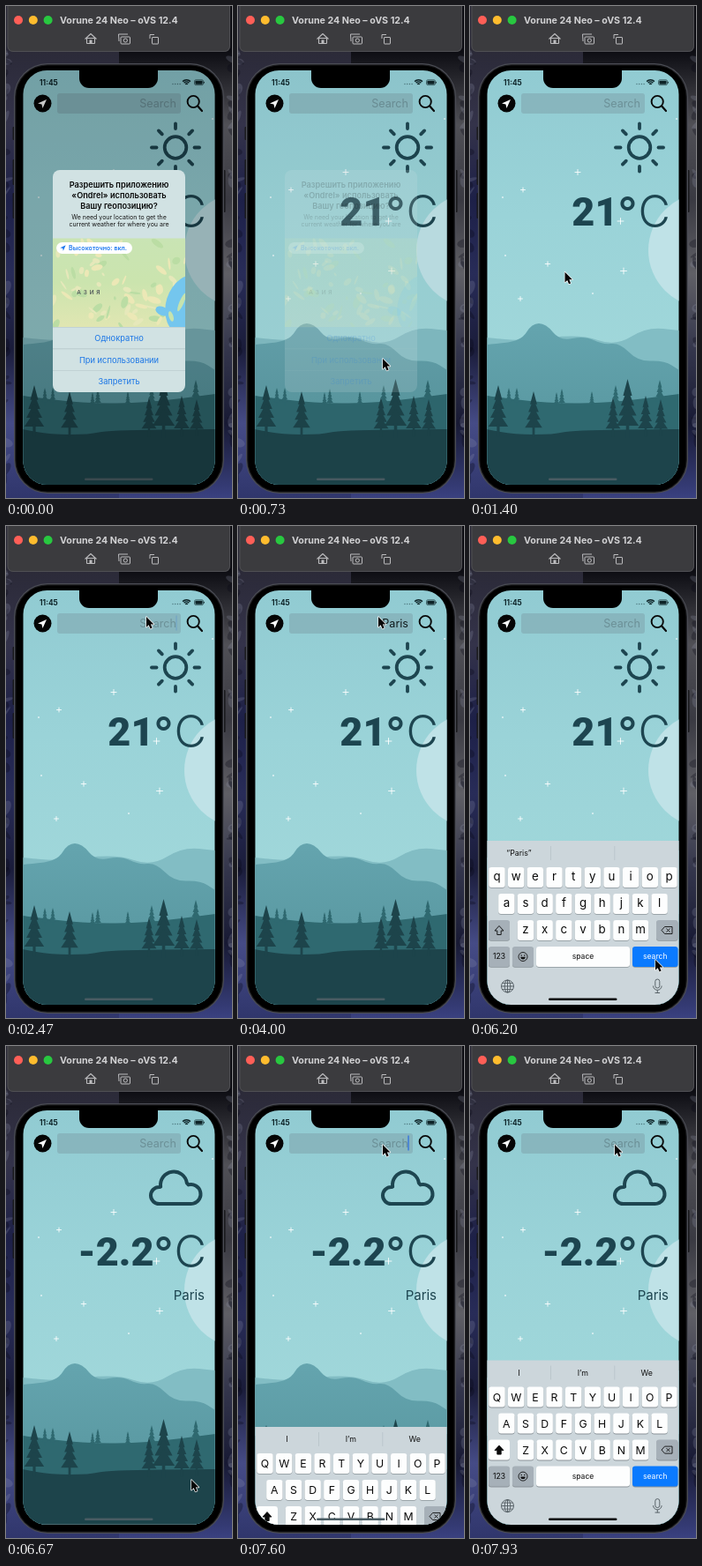
Animation, 256 px wide and 558 px high, one loop 8 s. Source, as an HTML page with a canvas:

```html
<!DOCTYPE html>
<html lang="ru">
<head>
<meta charset="utf-8">
<title>Weather app</title>
<style>
html, body { margin: 0; width: 100%; height: 100%; overflow: hidden; background: #0a0c1c; }
canvas { display: block; width: 256px; height: 558px; }
</style>
</head>
<body>
<canvas id="stage"></canvas>
<script>
const W = 256, H = 558, LOOP = 8000;
const cv = document.getElementById('stage');
const c = cv.getContext('2d');
const dpr = window.devicePixelRatio || 1;
cv.width = W * dpr;
cv.height = H * dpr;

const INK = '#1d4550', BLUE = '#0a7aff', TAU = Math.PI * 2;
const SANS = 'Inter, Roboto, sans-serif';

// ---- timing, ms ----
const T = {
  allow: 555, focus: 2200, rise: 5165, search: 6195, result: 6670, refocus: 7490,
  keys: [2670, 3070, 3330, 3530, 3670]
};
const CITY = 'Paris';

// ---- helpers ----
const clamp = v => Math.min(1, Math.max(0, v));
const ease = v => v * v * (3 - 2 * v);
// critically damped spring: share of the way still to go
function rest(ms) {
  const k = Math.max(0, ms) * 0.018;
  return (1 + k) * Math.exp(-k);
}
function random(seed) {
  return () => (seed = (seed * 16807) % 2147483647) / 2147483647;
}
function fill(color) {
  c.fillStyle = color;
  c.fill();
}
function stroke(color, width) {
  c.strokeStyle = color;
  c.lineWidth = width;
  c.stroke();
}
function box(x, y, w, h, r, color) {
  c.beginPath();
  c.roundRect(x, y, w, h, r);
  fill(color);
}
function frameBox(x, y, w, h, r, color, width) {
  c.beginPath();
  c.roundRect(x, y, w, h, r);
  stroke(color, width);
}
function oval(x, y, rx, ry, tilt = 0) {
  c.beginPath();
  c.ellipse(x, y, rx, ry, tilt, 0, TAU);
}
function disc(x, y, r, color) {
  oval(x, y, r, r);
  fill(color);
}
function ring(x, y, r, color, width) {
  oval(x, y, r, r);
  stroke(color, width);
}
function trace(...points) {
  c.beginPath();
  points.forEach(p => c.lineTo(...p));
}
function line(color, width, ...points) {
  trace(...points);
  stroke(color, width);
}
function cross(x, y, r, color, width) {
  line(color, width, [x - r, y], [x + r, y]);
  line(color, width, [x, y - r], [x, y + r]);
}
function text(str, x, y, size, color, weight = 400, align = 'center', family = SANS) {
  c.font = `${weight} ${size}px ${family}`;
  c.textAlign = align;
  c.fillStyle = color;
  c.fillText(str, x, y);
}
function vertical(y0, y1, ...colors) {
  const g = c.createLinearGradient(0, y0, 0, y1);
  colors.forEach((col, i) => g.addColorStop(i / (colors.length - 1), col));
  return g;
}

// ---- desktop and window ----
function desktop() {
  c.fillStyle = vertical(50, H, '#2b2a38', '#34334a', '#1d2048', '#282c58', '#1a1c3a', '#454b86', '#30366c');
  c.fillRect(0, 0, W / 2, H);
  c.fillStyle = vertical(50, H, '#0c0c12', '#505056', '#3a3a42', '#606066', '#34364c', '#181a34', '#3a4180');
  c.fillRect(W / 2, 0, W / 2, H);
  const rnd = random(77);
  for (let i = 0; i < 60; i++) {
    oval(i % 2 * W, 52 + rnd() * 506, 2 + rnd() * 7, 1 + rnd() * 4, rnd() * 3);
    fill(rnd() < 0.5 ? 'rgba(160,165,190,.2)' : 'rgba(6,7,20,.3)');
  }
}
function toolbar() {
  box(1.5, -8, 252.5, 60, 6, '#3b3b3e');
  frameBox(2, -8, 251.5, 59.5, 6, '#5a5a5e', 0.7);
  ['#ff5f57', '#febc2e', '#28c840'].forEach((col, i) => disc(14 + i * 16.8, 16, 5, col));
  text('Vorune 24 Neo – oVS 12.4', 61, 20, 10.7, '#d2d2d4', 700, 'left');
  const g = '#bcbcbe';
  c.lineJoin = 'round';
  line(g, 1.1, [89.5, 37.5], [96, 31.5], [102.5, 37.5]);
  frameBox(91.5, 36.5, 9, 6, 0.5, g, 1.1);
  box(94.5, 38.5, 3, 4, 0, g);
  line(g, 1, [128, 40], [127.5, 32], [138, 32]);
  frameBox(130, 35, 10.5, 8, 1, g, 1);
  ring(135.3, 39, 2.1, g, 1);
  frameBox(165.5, 35.5, 7, 7.5, 0.5, g, 1);
  line(g, 1, [163, 37], [163, 32.5], [168, 32.5]);
}
function phoneBody() {
  box(7.6, 137, 3, 15, 1, '#17171a');
  [174, 212].forEach(y => box(7.6, y, 3, 29, 1, '#17171a'));
  box(245.5, 186, 3, 48, 1, '#17171a');
  ['#4b4d55', '#1a1a1d', '#000'].forEach((col, i) => {
    const d = i * 1.2;
    box(9 + d, 65 + d, 238 - 2 * d, 488 - 2 * d, 38 - d, col);
  });
}

// ---- scenery ----
function tree(x, top, bottom, color) {
  const h = bottom - top, half = h * 0.2;
  for (let i = 0; i < 4; i++) {
    const w = half * (0.4 + i * 0.2), y = top + h * i * 0.18;
    trace([x, y], [x + w, y + h * 0.3], [x - w, y + h * 0.3]);
    fill(color);
  }
  c.fillRect(x - half * 0.14, top + h * 0.8, half * 0.28, h * 0.25);
}
// smooth hill line through the middles between the given points
function ridge(color, ...points) {
  c.beginPath();
  c.moveTo(19, 545);
  c.lineTo(...points[0]);
  points.slice(1).forEach(([x, y], i) => {
    const [px, py] = points[i];
    c.quadraticCurveTo(px, py, (px + x) / 2, (py + y) / 2);
  });
  c.lineTo(...points[points.length - 1]);
  c.lineTo(238, 545);
  fill(color);
}
function scenery() {
  c.fillStyle = vertical(73, 400, '#91cbd2', '#9ad3d8', '#a0d7da');
  c.fillRect(19, 73, 218, 470);
  disc(267, 277, 65, '#bfe2e7');
  [[122, 188.5], [60, 208.5], [174, 300.5], [88, 292.5], [57, 332], [170.5, 244]]
    .forEach(([x, y]) => cross(x, y, 2.4 + x / 120, 'rgba(255,255,255,.85)', 1));
  [[40, 283], [139, 326], [37, 217], [234, 128]].forEach(p => disc(...p, 1, 'rgba(255,255,255,.7)'));

  ridge('#82bdc4', [19, 376], [60, 380], [125, 372], [165, 386], [200, 364], [237, 368]);
  ridge(vertical(362, 450, '#64a4ae', '#5c9ba4'), [19, 384], [58, 380], [70, 360], [86, 360], [102, 380],
    [130, 374], [150, 384], [170, 382], [190, 403], [220, 402], [237, 413]);

  const mid = '#2f6970', front = '#1d444b';
  ridge(mid, [19, 442], [90, 451], [160, 450], [237, 440]);
  [[44, 433], [53, 433], [98, 438], [104, 434], [138, 437], [165, 430], [215, 424]]
    .forEach(([x, top]) => tree(x, top, 453, mid));
  ridge(front, [19, 480], [50, 486], [95, 486], [115, 481], [237, 480]);
  [[32, 430], [72, 437], [162, 444], [178.5, 423], [199, 442], [216, 446]]
    .forEach(([x, top]) => tree(x, top, 486, front));
}

// ---- app ----
function arrow(x, y, s, color) {
  trace([x + s, y - s], [x + s * 0.1, y + s], [x - s * 0.1, y + s * 0.1], [x - s, y - s * 0.1]);
  fill(color);
}
function statusBar() {
  const dark = '#0d2327';
  text('11:45', 38, 90, 8.3, dark, 700, 'left');
  for (let i = 0; i < 4; i++) disc(189 + i * 2.7, 88.5, 0.7, '#4b757b');
  for (let i = 0; i < 3; i++) {
    c.beginPath();
    c.arc(204.5, 90, 1.8 + i * 2.2, -TAU * 0.375, -TAU * 0.125);
    stroke(dark, 1.5);
  }
  frameBox(213.5, 83.8, 10, 5.8, 1.6, dark, 0.6);
  box(214.4, 84.7, 8.2, 4, 0.9, dark);
  box(224.2, 85.7, 0.8, 2, 0.4, dark);
}
function sun() {
  ring(192, 160.5, 12.3, INK, 3.8);
  c.lineCap = 'round';
  for (let i = 0; i < 8; i++) {
    const a = i * TAU / 8, at = r => [192 + Math.cos(a) * r, 160.5 + Math.sin(a) * r];
    line(INK, 3.8, at(21.5), at(27));
  }
  c.lineCap = 'butt';
}
function cloud() {
  const deg = TAU / 360;
  c.beginPath();
  c.arc(173.5, 169.5, 9.5, 90 * deg, 272 * deg);
  c.arc(190, 157.5, 15, 172 * deg, 352 * deg);
  c.arc(209.5, 168, 11, 255 * deg, 450 * deg);
  c.closePath();
  stroke(INK, 4);
}
// visible for a while after each edit, then dark for 200 of every 500 ms
function caret(t) {
  const edit = [T.focus, ...T.keys, T.refocus].filter(k => k <= t).pop();
  if (!edit || (t >= T.search && t < T.refocus)) return 0;
  const u = (t - edit) % 500;
  return 1 - clamp((u - 240) / 40) * clamp((490 - u) / 40);
}
function searchBar(t) {
  disc(41.5, 110.5, 10, '#050505');
  arrow(41, 111, 5, '#fff');
  box(58, 99, 140, 23, 3, 'rgba(110,130,140,.3)');
  const typed = t < T.search ? CITY.slice(0, T.keys.filter(k => k <= t).length) : '';
  text(typed || 'Search', 193, 115, 12.6, typed ? '#101a1c' : '#6c9097', 400, 'right');
  c.globalAlpha = caret(t);
  box(192.4, 101.5, 1.3, 17, 0, '#2f6fe0');
  c.globalAlpha = 1;
  ring(212.2, 108.5, 6.6, '#080808', 1.9);
  c.lineCap = 'round';
  line('#080808', 2.2, [217.2, 113.6], [222, 119]);
  c.lineCap = 'butt';
}
function weather(found) {
  found ? cloud() : sun();
  text(found ? '-2.2' : '21', 167.5, 249.3, 45, INK, 900, 'right', 'Roboto, Inter, sans-serif');
  text('°', 178.5, 251, 48, INK, 500);
  text('C', 227, 251.3, 50, INK, 300, 'right');
  if (found) text(CITY, 225, 287.5, 15, INK, 400, 'right');
}

// ---- permission dialog ----
function map() {
  c.save();
  c.beginPath();
  c.rect(53, 263.5, 150, 100.5);
  c.clip();
  c.fillStyle = vertical(263, 364, '#c9e4b4', '#cbe4ae', '#e0e6b2');
  c.fillRect(53, 263, 150, 102);
  const rnd = random(431);
  for (let i = 0; i < 70; i++) {
    oval(53 + rnd() * 150, 266 + rnd() * 98, 2 + rnd() * 7, 1 + rnd() * 3, rnd() * 3);
    fill(['#e6e8ba', '#bbdda4', '#ecE8b6'][i % 3]);
  }
  const sea = '#74c6ee', land = '#c6e3ae';
  oval(209, 340, 28, 36, 0.3);
  fill(sea);
  oval(177, 346, 8, 5, 0.4);
  fill(sea);
  oval(187, 352, 2.5, 6, -0.3);
  fill(land);
  oval(199, 336, 2.5, 11, 0.4);
  fill(land);
  c.restore();
  [...'АЗИЯ'].forEach((ch, i) => text(ch, 82.5 + i * 7.3, 327, 6.4, '#50585a', 600));
  box(57, 268, 86, 13, 6.5, '#fff');
  arrow(64.5, 274.5, 3.2, '#1b78f0');
  text('Высокоточно: вкл.', 71, 277, 7.1, '#1b78f0', 600, 'left');
}
function dialog(alpha) {
  if (alpha < 0.004) return;
  c.fillStyle = `rgba(0,0,0,${0.21 * alpha})`;
  c.fillRect(19, 73, 218, 470);
  c.globalAlpha = alpha;
  box(53, 186, 150, 252, 8, '#d1e2e3');
  ['Разрешить приложению', '«Ondrel» использовать', 'Вашу геопозицию?']
    .forEach((s, i) => text(s, 128, 206 + i * 12, 9.2, '#0a0a0a', 600));
  ['We need your location to get the', 'current weather for where you are']
    .forEach((s, i) => text(s, 128, 241.5 + i * 8.5, 7, '#141414'));
  map();
  ['Однократно', 'При использовании', 'Запретить'].forEach((s, i) => {
    const y = 364 + i * 24.6;
    box(53, y, 150, 0.6, 0, '#b2c3c6');
    text(s, 128, y + 16, 9.3, '#1b76e6');
  });
  c.globalAlpha = 1;
}

// ---- keyboard ----
const WHITE = '#fdfefe', GREY = '#a6b0b8';
function key(x, row, w, color, label, ink = '#0a0a0a') {
  const y = 386 + row * 30;
  box(x, y + 0.8, w, 23, 3, '#8b9499');
  box(x, y, w, 23, 3, color);
  if (label) text(label, x + w / 2, y + 14.2, 8.6, ink);
}
function letters(caps) {
  ['qwertyuiop', 'asdfghjkl', 'zxcvbnm'].forEach((row, r) => {
    const first = 128 - (row.length - 1) * 10.83;
    [...row].forEach((ch, i) => {
      const x = first + i * 21.66;
      key(x - 9.2, r, 18.4, WHITE);
      text(caps ? ch.toUpperCase() : ch, x, 401 + caps + r * 30, caps ? 12.3 : 13.3, '#0a0a0a');
    });
  });
}
function globe(x, y, ink) {
  ring(x, y, 7, ink, 0.9);
  oval(x, y, 3.3, 7);
  stroke(ink, 0.9);
  cross(x, y, 7, ink, 0.9);
  [-3.5, 3.5].forEach(d => line(ink, 0.8, [x - 6, y + d], [x + 6, y + d]));
}
function microphone(x, y, ink) {
  frameBox(x - 2.5, y - 7.5, 5, 10, 2.5, ink, 0.9);
  c.beginPath();
  c.arc(x, y, 4.8, 0, TAU / 2);
  stroke(ink, 0.9);
  line(ink, 0.9, [x, y + 4.8], [x, y + 8]);
  line(ink, 0.9, [x - 2.8, y + 8], [x + 2.8, y + 8]);
}
function keyboard(drop, caps) {
  c.save();
  c.translate(0, drop);
  box(19, 356, 218, 190, 0, '#ccd6db');
  [91, 163.5].forEach(x => box(x, 362, 0.7, 16, 0, '#b4bfc5'));
  (caps ? ['I', 'I’m', 'We'] : [`“${CITY}”`]).forEach((s, i) => text(s, 55.5 + i * 72.3, 373, 8.8, '#111'));
  letters(caps);

  key(21, 2, 24, caps ? WHITE : GREY);
  trace([33, 452.5], [38, 458], [35.2, 458], [35.2, 462.5], [30.8, 462.5], [30.8, 458], [28, 458]);
  c.closePath();
  stroke('#0a0a0a', 0.9);
  if (caps) fill('#0a0a0a');
  key(211, 2, 24.5, GREY);
  trace([217, 457.5], [220.5, 453.5], [229, 453.5], [229, 461.5], [220.5, 461.5]);
  c.closePath();
  stroke('#111', 0.9);
  [-2, 2].forEach(d => line('#111', 0.9, [222.5, 457.5 - d], [226.5, 457.5 + d]));

  key(21, 3, 24, GREY, '123');
  key(48, 3, 24, GREY);
  ring(60, 487.5, 5, '#111', 0.9);
  [58.2, 61.8].forEach(x => disc(x, 486, 0.75, '#111'));
  c.beginPath();
  c.arc(60, 487.8, 2.7, 0, TAU / 2);
  fill('#111');
  key(75, 3, 106, WHITE, 'space');
  key(184, 3, 51.5, BLUE, 'search', '#fff');
  globe(42.5, 521, '#4e585e');
  microphone(212.3, 520.5, '#4e585e');
  c.restore();
}

// ---- pointer: [start, end, from, bend, to] ----
const MOVES = [
  [230, 540, [262, 330], [200, 385], [164, 400]],
  [1080, 1940, [164, 400], [34, 240], [159, 103]],
  [5450, 6000, [159, 103], [292, 388], [210, 492]],
  [6820, 7400, [210, 492], [200, 270], [164, 112]]
];
function pointer(t) {
  const [a, b, p, q, r] = MOVES.filter(m => t >= m[0]).pop() || MOVES[0];
  const k = ease(clamp((t - a) / (b - a))), n = 1 - k;
  const [x, y] = [0, 1].map(i => n * n * p[i] + 2 * n * k * q[i] + k * k * r[i]);
  c.save();
  c.translate(x, y);
  c.scale(0.9, 0.9);
  trace([0, 0], [0, 13], [3, 10.3], [5, 15], [7.4, 14], [5.4, 9.4], [9.4, 9.4]);
  c.closePath();
  stroke('#fff', 1.5);
  fill('#050505');
  c.restore();
}

function draw(t) {
  c.setTransform(dpr, 0, 0, dpr, 0, 0);
  desktop();
  toolbar();
  phoneBody();
  c.save();
  c.beginPath();
  c.roundRect(19.5, 73, 217, 470, 27);
  c.clip();
  scenery();
  statusBar();
  searchBar(t);
  weather(t >= T.result);
  const hidden = t < T.search ? rest(t - T.rise)
    : t < T.refocus ? 1 - rest(t - T.search)
    : rest(t - T.refocus);
  keyboard(hidden * 187, t >= T.refocus);
  box(89, 535.5, 77.5, 2.6, 1.3, hidden < 0.3 ? '#050505' : '#4a5c63');
  dialog(rest(t - T.allow));
  box(83, 66, 89, 27, [0, 0, 11, 11], '#000');
  c.restore();
  pointer(t);
}

const start = performance.now();
function frame() {
  draw((performance.now() - start) % LOOP);
  requestAnimationFrame(frame);
}
frame();
</script>
</body>
</html>
```
